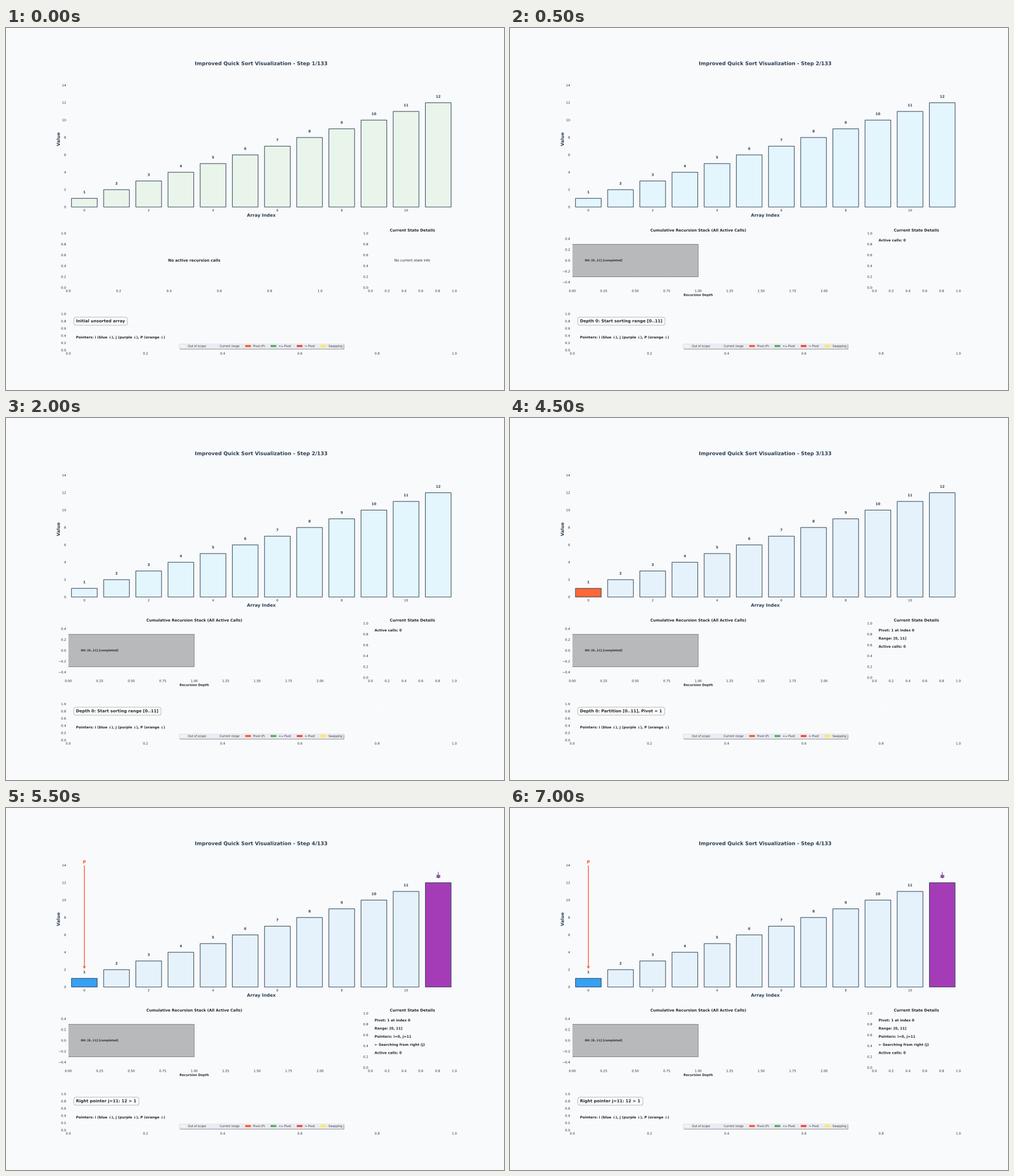
These frames come from a looping animation (877x638 px, 8 s). A matplotlib script:

```python
import matplotlib.pyplot as plt
from matplotlib import patheffects
from matplotlib.animation import FuncAnimation
from matplotlib.patches import Patch

BG = "#F8FAFC"
INK = "#2C3E50"
ORANGE, BLUE, PURPLE = "#FF5722", "#2196F3", "#9C27B0"
IN_RANGE = "#E3F2FD"
VALUES = list(range(1, 13))
TOTAL_STEPS = 133

LEGEND = [
    ("Out of scope", "#F5F5F5"),
    ("Current range", IN_RANGE),
    ("Pivot (P)", ORANGE),
    ("<= Pivot", "#4CAF50"),
    ("> Pivot", "#F44336"),
    ("Swapping", "#FFEB3B"),
]

PIVOT_INFO = ["Pivot: 1 at index 0", "Range: [0, 11]"]

# Per step: message, base bar colour, special bars, detail lines
STEPS = [
    dict(message="Initial unsorted array", base="#E8F5E8", marked={}, details=[]),
    dict(message="Depth 0: Start sorting range [0..11]", base="#E1F5FE",
         marked={}, details=["Active calls: 0"]),
    dict(message="Depth 0: Partition [0..11], Pivot = 1", base=IN_RANGE,
         marked={0: ORANGE}, details=PIVOT_INFO + ["Active calls: 0"]),
    dict(message="Right pointer j=11: 12 > 1", base=IN_RANGE,
         marked={0: BLUE, 11: PURPLE},
         details=PIVOT_INFO + ["Pointers: i=0, j=11",
                               "← Searching from right (j)",
                               "Active calls: 0"],
         pointers=[("P", 0, 14.35, 2.0, ORANGE), ("j", 11, 13.0, 12.45, PURPLE)]),
]

plt.rcParams.update({
    "font.family": "DejaVu Sans",
    "text.color": ".15",
    "text.hinting": "none",
    "axes.labelcolor": ".15",
    "axes.facecolor": BG,
    "axes.linewidth": 0,
    "axes.axisbelow": True,
    "axes.grid": True,
    "grid.color": "white",
    "grid.linewidth": 1,
    "patch.linewidth": 0.3,
    "path.snap": False,
    # outline drawing keeps small text at sub-pixel positions
    "path.effects": [patheffects.Normal()],
})
for axis in ("xtick", "ytick"):
    plt.rcParams.update({f"{axis}.color": ".15", f"{axis}.labelsize": 10,
                         f"{axis}.major.size": 0, f"{axis}.major.pad": 7})

fig = plt.figure(figsize=(22, 16), dpi=39.875, facecolor=BG)
grid = fig.add_gridspec(3, 2, height_ratios=[3, 1.2, 0.8],
                        width_ratios=[3, 1], hspace=0.35, wspace=0.3)
ax_bars = fig.add_subplot(grid[0, :])
ax_stack = fig.add_subplot(grid[1, 0])
ax_state = fig.add_subplot(grid[1, 1])
ax_info = fig.add_subplot(grid[2, :])


def bold(ax, x, y, text, size, **kw):
    return ax.text(x, y, text, fontsize=size, fontweight="bold", **kw)


def draw_bars(number, step):
    ax = ax_bars
    ax.grid(False)
    colors = [step["marked"].get(i, step["base"]) for i in range(len(VALUES))]
    ax.bar(range(len(VALUES)), VALUES, color=colors, edgecolor=INK,
           linewidth=2, alpha=0.9)
    for i, value in enumerate(VALUES):
        bold(ax, i, value + 0.5, str(value), 11, color=INK,
             ha="center", va="bottom")
    for name, index, top, tip, color in step.get("pointers", []):
        ax.annotate(name, xy=(index, tip), xytext=(index, top), color=color,
                    fontsize=14, fontweight="bold", ha="center", va="center",
                    arrowprops=dict(arrowstyle="->", color=color, lw=2.5))
    ax.set_xlim(-0.5, len(VALUES) - 0.5)
    ax.set_ylim(0, max(VALUES) * 1.3)
    label = dict(fontsize=14, fontweight="bold", color=INK)
    ax.set_xlabel("Array Index", **label)
    ax.set_ylabel("Value", **label)
    ax.set_title(f"Improved Quick Sort Visualization - Step {number}/{TOTAL_STEPS}",
                 fontsize=16, fontweight="bold", color=INK, pad=20)


def draw_stack(active):
    ax = ax_stack
    if not active:
        bold(ax, 0.5, 0.5, "No active recursion calls", 12,
             ha="center", va="center")
        return
    ax.barh(0, 1, height=0.6, color="#9E9E9E", edgecolor="black",
            linewidth=1, alpha=0.7)
    bold(ax, 0.1, 0, "D0: [0..11] [completed]", 9, va="center")
    ax.set_xlim(0, 2)
    ax.set_ylim(-0.5, 0.5)
    ax.set_xlabel("Recursion Depth", fontsize=10, fontweight="bold")
    ax.set_title("Cumulative Recursion Stack (All Active Calls)",
                 fontsize=12, fontweight="bold")


def draw_state(details):
    ax = ax_state
    ax.set_title("Current State Details", fontsize=12, fontweight="bold")
    if not details:
        ax.text(0.5, 0.5, "No current state info", fontsize=11,
                ha="center", va="center")
    for row, line in enumerate(details):
        bold(ax, 0.05, 0.9 - 0.15 * row, line, 11, va="top")


def draw_info(message):
    ax = ax_info
    bold(ax, 0.02, 0.8, message, 13, va="center",
         bbox=dict(boxstyle="round,pad=0.5", facecolor="white",
                   edgecolor="gray", linewidth=1))
    bold(ax, 0.02, 0.35, "Pointers: i (blue ↓), j (purple ↓), P (orange ↓)",
         11, va="center")
    handles = [Patch(facecolor=color, label=name) for name, color in LEGEND]
    ax.legend(handles=handles, loc="lower center", ncol=len(LEGEND),
              fontsize=9, frameon=True, shadow=True, facecolor="#EAEAF2")


def update(frame):
    # the opening step lasts one tick, every later one five
    index = 0 if frame == 0 else 1 + (frame - 1) // 5
    step = STEPS[index]
    for ax in (ax_bars, ax_stack, ax_state, ax_info):
        ax.clear()
    draw_bars(index + 1, step)
    draw_stack(index > 0)
    draw_state(step["details"])
    draw_info(step["message"])
    return []


anim = FuncAnimation(fig, update, frames=16, interval=500, repeat=True,
                     repeat_delay=0, init_func=lambda: [], blit=False)
plt.show()
```
